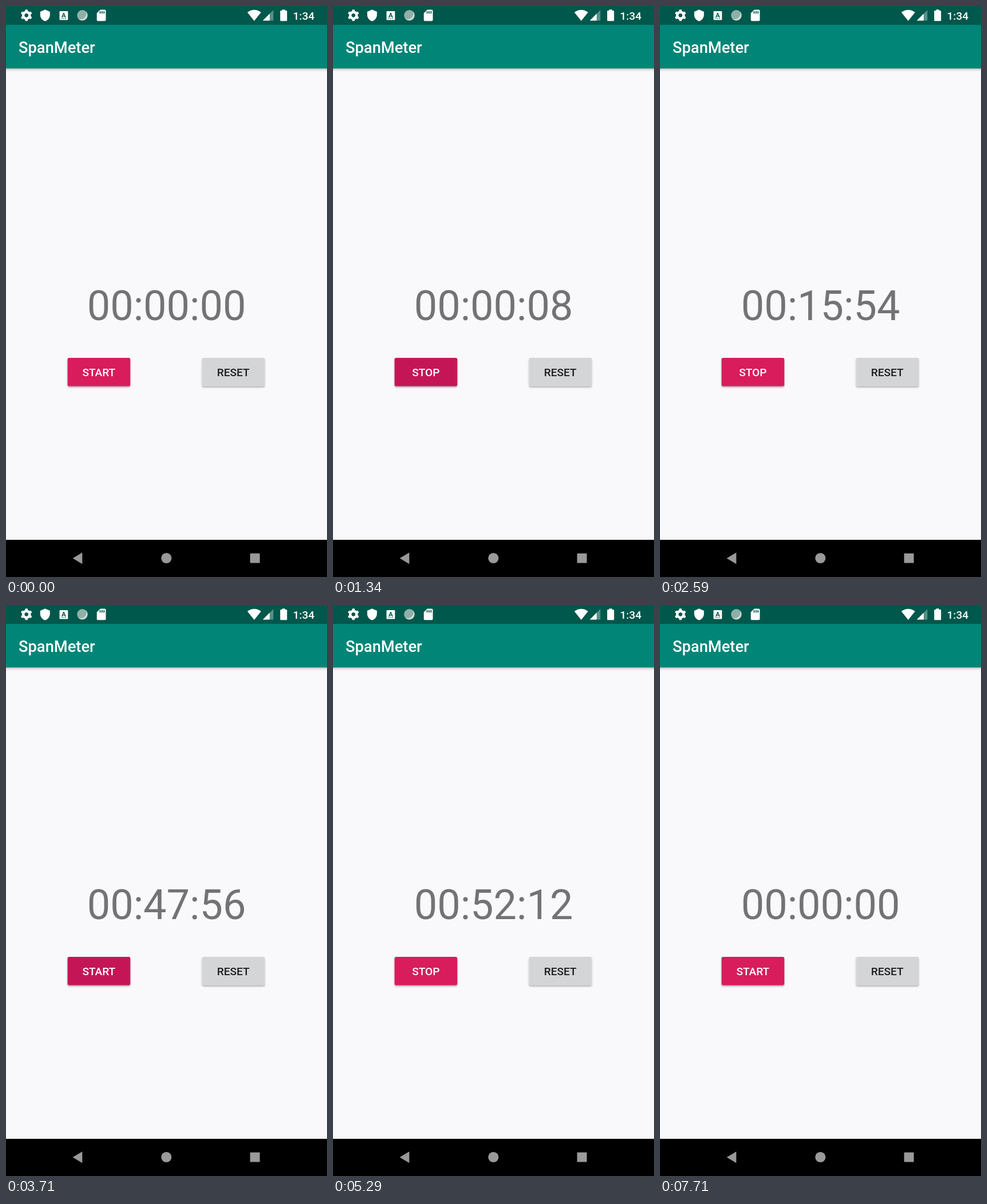
Recreate the animation shown at these times as an HTML page. Size 561 px wide and 998 px high, loop 7.79 s.

```html
<!DOCTYPE html>
<html lang="en">
<head>
<meta charset="utf-8">
<title>Stopwatch</title>
<style>
  html, body { margin: 0; width: 100%; height: 100%; overflow: hidden; background: #f9f9fb; }
  svg { display: block; width: 100vw; height: 100vh; }
  text { font-family: Roboto, sans-serif; font-weight: 500; fill: #fff; }
  .mid { text-anchor: middle; }
  .label { font-size: 19.1px; }
  #clock { font-size: 72px; font-weight: 400; fill: #737375; }
</style>
</head>
<body>
<svg viewBox="0 0 561 998">
  <defs>
    <linearGradient id="shade" x2="0" y2="1">
      <stop offset="0" stop-opacity=".3"/>
      <stop offset=".4" stop-opacity=".1"/>
      <stop offset="1" stop-opacity="0"/>
    </linearGradient>
    <filter id="lift" x="-10%" y="-20%" width="120%" height="150%">
      <feDropShadow dx="0" dy="1.8" stdDeviation="1.4" flood-opacity=".35"/>
    </filter>
  </defs>

  <rect width="561" height="998" fill="#f9f9fb"/>
  <rect y="109" width="561" height="6" fill="url(#shade)"/>
  <rect width="561" height="109" fill="#008577"/>
  <rect width="561" height="33" fill="#00574b"/>
  <text x="22" y="81.5" font-size="27.3">SpanMeter</text>

  <!-- Status bar -->
  <g fill="#fff">
    <g id="gear" transform="translate(35.7 16.3)">
      <circle r="5.6" fill="none" stroke="#fff" stroke-width="4.4"/>
    </g>
    <path d="M68.300 6.200L76.800 10V15.500C76.800 20.500 73.200 25.200 68.300 26.600C63.400 25.200 59.800 20.500 59.800 15.500V10Z"/>
    <rect x="93.500" y="9" width="14.800" height="15.400" rx="1.200"/>
    <text x="100.800" y="19.500" class="mid" font-size="11.500" style="fill:#00574b;font-weight:700">A</text>
    <path d="M97 21.700h1.600m1.500 0h1.600m1.500 0h1.600" stroke="#00574b" stroke-width="1.300"/>
    <circle cx="133.500" cy="16.300" r="9.300" fill="#8fb0a8"/>
    <path d="M140 9.700A9.300 9.300 0 0 1 126 22A10 10 0 0 0 140 9.700Z" fill="#d3dfdb"/>
    <path d="M164.800 6.500H172.500Q174.500 6.500 174.500 8.500V24.300Q174.500 26.300 172.500 26.300H160.700Q158.700 26.300 158.700 24.300V12.600Z"/>
    <path d="M164.500 9v4.300m3.400-4.300v4.300m3.400-4.300v4.300" stroke="#00574b" stroke-width="1.800"/>
    <path d="M433.800 26L421.800 11Q433.800 2.500 445.800 11Z"/>
    <path d="M467.300 7V25.500H448.800Z" opacity=".34"/>
    <path d="M460.800 13.500V25.500H448.800Z"/>
    <path d="M482.500 8V6.200H487.700V8H490Q491.200 8 491.200 9.300V24.900Q491.200 26.200 490 26.200H480.400Q479.200 26.200 479.200 24.900V9.300Q479.200 8 480.400 8Z"/>
  </g>
  <text x="501.500" y="23.500" font-size="19.100">1:34</text>

  <text id="clock" class="mid" x="280.600" y="549"></text>

  <rect id="toggle" x="107.600" y="615" width="109.600" height="49.500" rx="2.700" filter="url(#lift)"/>
  <text id="caption" class="mid label" x="162.300" y="647"></text>
  <rect id="reset" x="342.700" y="615" width="109.400" height="49.500" rx="2.700" filter="url(#lift)"/>
  <text class="mid label" x="397.200" y="647" style="fill:#1d1d1f">RESET</text>

  <!-- Navigation bar -->
  <rect y="933" width="561" height="65"/>
  <g fill="#999">
    <path d="M116.600 965.300L133.300 955.300V975.300Z"/>
    <circle cx="280.300" cy="965" r="9.100"/>
    <rect x="426.600" y="956.800" width="17" height="16.800" rx="1"/>
  </g>
</svg>
<script>
  const LOOP = 7790, TICK = 41.667;
  const START = 32, STOP = 89, RESUME = 118, HALT = 146, CLEAR = 167;
  // [tick, centiseconds on the clock]
  const keys = [[0, 0], [START, 8], [62, 1554], [STOP, 4756], [RESUME, 4766],
                [127, 5212], [HALT, 6138]];
  const $ = id => document.getElementById(id);
  const two = n => String(n).padStart(2, "0");

  for (let a = 0; a < 360; a += 60) {
    const tooth = document.createElementNS("http://www.w3.org/2000/svg", "path");
    tooth.setAttribute("d", "M-2.600 -6.500L-1.900 -10H1.900L2.600 -6.500Z");
    tooth.setAttribute("transform", `rotate(${a})`);
    $("gear").append(tooth);
  }

  function elapsed(n) {
    if (n < START || n >= CLEAR) return 0;
    if (n >= HALT) return keys.at(-1)[1];
    if (n >= STOP && n < RESUME) return 4756;
    const i = keys.findIndex(k => k[0] > n);
    const [a, from] = keys[i - 1], [b, to] = keys[i];
    return Math.round(from + (to - from) * (n - a) / (b - a));
  }

  function draw(now) {
    const n = Math.floor((now % LOOP + 2) / TICK);
    const c = elapsed(n);
    const running = n >= START && n < STOP || n >= RESUME && n < HALT;
    const pressed = [START, STOP, RESUME, HALT].includes(n);
    $("clock").textContent =
      [c / 6000, c / 100 % 60, c % 100].map(v => two(Math.floor(v))).join(":");
    $("caption").textContent = running ? "STOP" : "START";
    $("toggle").setAttribute("fill", pressed ? "#c41757" : "#d81b5c");
    $("reset").setAttribute("fill", n === CLEAR ? "#c2c3c3" : "#d4d5d6");
  }

  const origin = performance.now();
  function frame() {
    draw(performance.now() - origin);
    requestAnimationFrame(frame);
  }
  frame();
</script>
</body>
</html>
```
